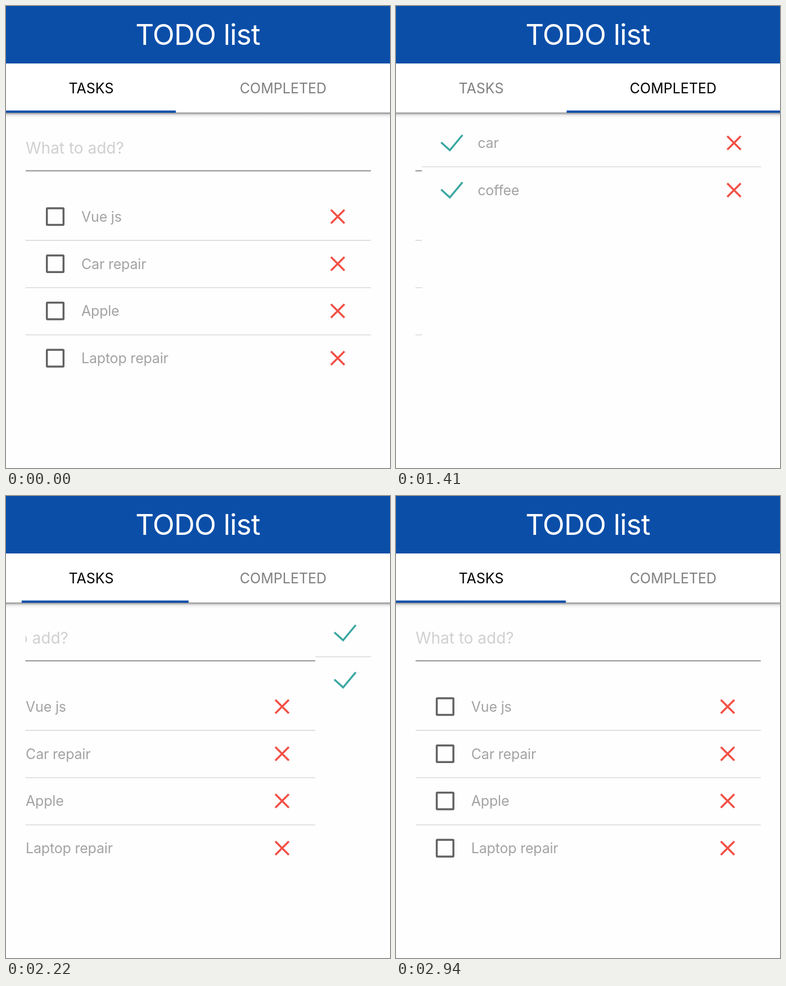
These frames come from a looping animation (683x820 px, 2.97 s). An HTML page:

```html
<!DOCTYPE html>
<html lang="en">
<head>
<meta charset="utf-8">
<title>TODO list</title>
<style>
  html, body { margin: 0; width: 100%; height: 100%; overflow: hidden; background: #fefefe; }
  svg { display: block; width: 100%; height: 100%; }
  text { font: 25px Inter, "Open Sans", sans-serif; }
  .title { font-size: 51px; letter-spacing: -.8px; fill: #fff; }
  .middle { text-anchor: middle; }
  .hint { font-size: 28px; fill: #d0d0d0; }
  .item { letter-spacing: -.2px; fill: #a3a3a3; }
  .rule { stroke: #dedede; stroke-width: 1.8; }
  .field { stroke: #909090; stroke-width: 1.8; }
  .box, .check, .cross { fill: none; stroke-width: 3.5; }
  .box { stroke: #626262; }
  .check { stroke: #3ba7a2; }
  .cross { stroke: #f24f45; }
</style>
</head>
<body>
<svg viewBox="0 0 683 820">
  <defs>
    <clipPath id="view"><rect x="34.5" y="200" width="615" height="620"/></clipPath>
    <linearGradient id="shade" x2="0" y2="1">
      <stop stop-color="#8c8c8c"/>
      <stop offset=".2" stop-color="#b4b4b4"/>
      <stop offset=".5" stop-color="#ececec"/>
      <stop offset="1" stop-color="#fefefe"/>
    </linearGradient>
  </defs>
  <rect width="683" height="102" fill="#0b4ea8"/>
  <text class="title middle" x="341" y="69">TODO list</text>
  <rect y="102" width="683" height="87" fill="#fff"/>
  <rect y="189" width="683" height="10" fill="url(#shade)"/>
  <text id="tasksTab" class="middle" x="151.5" y="155">TASKS</text>
  <text id="doneTab" class="middle" x="493" y="155">COMPLETED</text>
  <rect id="ink" y="185.5" height="4" fill="#0b4ea8"/>
  <g clip-path="url(#view)">
    <g id="panels">
      <text class="hint" x="35" y="262">What to add?</text>
      <path class="field" d="M35 292.5H649"/>
      <g id="tasks"></g>
      <g id="done" transform="translate(614)"></g>
    </g>
  </g>
</svg>
<script>
const LOOP = 2970, STEP = 30, WIDTH = 614, ROW = 83.8;
const OPEN = 726, BACK = 1880;
const $ = id => document.getElementById(id);

const box = y => `<rect class="box" x="72.7" y="${y - 14.8}" width="29.6" height="29.6" rx="1"/>`;
const check = y => `<path class="check" d="M69 ${y - 1}L84.5 ${y + 13}L107 ${y - 14}"/>`;

function fillList(id, names, top, icon) {
  $(id).innerHTML = names.map((name, i) => {
    const y = top + i * ROW;
    const rule = i < names.length - 1 ? `<path class="rule" d="M35 ${y + 42.3}H649"/>` : "";
    return `${icon(y)}<text class="item" x="134" y="${y + 9}">${name}</text>
      <path class="cross" d="M578 ${y - 12}l24 24m0-24l-24 24"/>${rule}`;
  }).join("");
}
fillList("tasks", ["Vue js", "Car repair", "Apple", "Laptop repair"], 373.7, box);
fillList("done", ["car", "coffee"], 243, check);

const clamp = v => Math.min(1, Math.max(0, v));

// Cubic Bézier easing, solved by bisection
function bezier(x1, y1, x2, y2) {
  const at = (a, b, s) => 3 * (1 - s) ** 2 * s * a + 3 * (1 - s) * s * s * b + s ** 3;
  return x => {
    let lo = 0, hi = 1;
    for (let i = 0; i < 24; i++) {
      const mid = (lo + hi) / 2;
      if (at(x1, x2, mid) < x) lo = mid; else hi = mid;
    }
    return at(y1, y2, hi);
  };
}
const easeOut = bezier(.25, .8, .25, 1);
const easeInOut = bezier(.35, 0, .25, 1);
const ramp = (t, start, length) => clamp((t - start) / length);

// The panels glide with exponential decay in both directions
function scrollAt(t) {
  if (t < OPEN) return 0;
  if (t < BACK) return WIDTH * (1 - Math.exp(-.00585 * (t - OPEN)));
  return Math.max(0, (WIDTH + 2) * Math.exp(-.00532 * (t - BACK)) - 2);
}

const grey = v => `rgb(${[v, v, v].map(Math.round)})`;

function draw(t) {
  $("panels").setAttribute("transform", `translate(${-scrollAt(t)})`);

  const left = 303.5 * (easeInOut(ramp(t, 765, 493)) - easeInOut(ramp(t, BACK + 10, 500)));
  const right = 302 + 381 * (easeOut(ramp(t, 735, 415)) - easeInOut(ramp(t, BACK + 10, 460)));
  $("ink").setAttribute("x", left);
  $("ink").setAttribute("width", right - left);

  $("tasksTab").style.fill = grey(128 * (ramp(t, OPEN, 150) - ramp(t, BACK, 50)));
  $("doneTab").style.fill = grey(128 * (1 - ramp(t, OPEN, 50) + ramp(t, BACK, 150)));
}

function tick() {
  const t = performance.now() % LOOP;
  draw(Math.floor(t / STEP) * STEP);
  requestAnimationFrame(tick);
}
tick();
</script>
</body>
</html>
```
